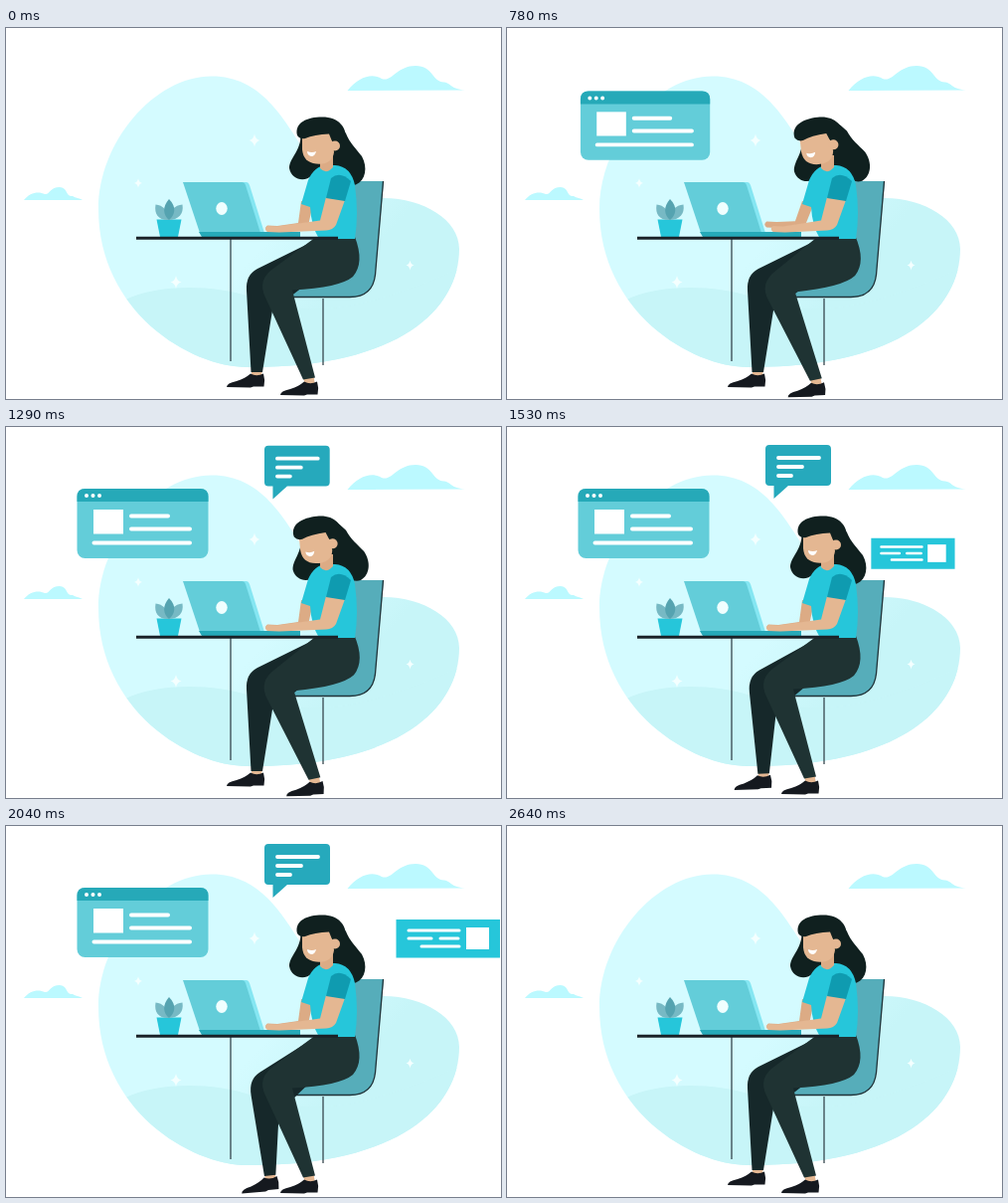
Animation of 498 by 373 pixels, one loop 2700 ms. Source, as an HTML page:

```html
<!DOCTYPE html>
<html lang="en">
<head>
<meta charset="utf-8">
<title>Working at a desk</title>
<style>
  html, body { margin: 0; width: 100%; height: 100%; overflow: hidden; background: #fff; }
  svg { display: block; width: 100vw; height: 100vh; }
  .line { fill: none; stroke: #fff; stroke-linecap: round; }
  .skin { fill: #e4b792; }
  .shade { fill: #dcab85; }
</style>
</head>
<body>
<svg viewBox="0 0 498 373">
  <defs>
    <linearGradient id="sky" x1="0.2" y1="0.2" x2="0.9" y2="0.7">
      <stop offset="0.5" stop-color="#d4fbff"/>
      <stop offset="0.8" stop-color="#c7f5f8"/>
    </linearGradient>
    <path id="blobShape" d="M93 182C93 115 149 48.500 207 48.500C257 48.500 279 91 302 126C325 160 352 171 380 171C420 171 456 193 456 222C456 283 395 342 243 341C185 341 93 285 93 182Z"/>
    <clipPath id="blobClip"><use href="#blobShape"/></clipPath>
    <path id="star" d="M0-6.5Q1-1 5.5 0Q1 1 0 6.5Q-1 1-5.5 0Q-1-1 0-6.5Z" fill="#f4ffff"/>
    <path id="shoe" d="M222 361Q222 357 232 355Q241 352 246 347.500Q252 351 259 347.500Q261 354 259.500 360.500H249L246 361.500Z" fill="#15191f"/>
  </defs>

  <use href="#blobShape" fill="url(#sky)"/>
  <path clip-path="url(#blobClip)" d="M118 274C150 258 205 257 245 270S330 300 460 240V345H118Z" fill="#c7f5f8"/>
  <use href="#star" x="250" y="113"/>
  <use href="#star" x="171" y="255.500"/>
  <use href="#star" transform="translate(133 156) scale(.72)"/>
  <use href="#star" transform="translate(406.500 238.500) scale(.75)"/>
  <g fill="#bbf9ff">
    <path d="M343.500 63C355 49 368 45 378 51C388 55 393 38 412 38C430 38 428 54 441 54.500C449 56 446 61 462 62.500Z"/>
    <path d="M18 173C24 165 33 164 39 167C44 168 44 160 54 160C62 160 60 170 67 169C70 171 74 171 77 173Z"/>
  </g>

  <g id="page">
    <rect x="71.500" y="62" width="132" height="70" rx="8" fill="#63cdd9"/>
    <path d="M71.500 75V70Q71.500 62 79.500 62H195.500Q203.500 62 203.500 70V75Z" fill="#26a9b8"/>
    <path class="line" stroke-width="4" d="M81 69h.01M87.500 69h.01M94 69h.01M126 89.500H163M126 102.500H185M88.500 116.500H185"/>
    <path d="M88 83h30v24.500h-30z" fill="#fff"/>
  </g>
  <g id="bubble">
    <path d="M264 18H322Q326 18 326 22V55Q326 59 322 59H283L268.500 72V59H264Q260 59 260 55V22Q260 18 264 18Z" fill="#26a9bc"/>
    <path class="line" stroke-width="3.800" d="M273 31H314M273 40H297M273 49H286"/>
  </g>
  <g id="card">
    <path d="M392.500 94h104.500v38.500h-104.500z" fill="#26c6da"/>
    <path class="line" stroke-width="3" d="M405 105H456M405 113H428M437 113H455M418 121H456"/>
    <path d="M463 102h23v22h-23z" fill="#fff"/>
  </g>

  <path d="M346 154H380L371.500 248Q369 270.500 346 270.500H289V245L340 230Z" fill="#56adba"/>
  <path d="M379.500 154L371.500 248Q369 270.500 346 270.500H289" fill="none" stroke="#203238" stroke-width="1.300"/>
  <path d="M226 212V335M319 272V339" stroke="#37474f" stroke-width="1.300"/>

  <g id="backLeg">
    <path class="skin" d="M247 342H258L257 351H247Z"/>
    <use href="#shoe"/>
    <path d="M316 211L253 242Q241 248 242 264L246.500 346H258L268 284L325 240Z" fill="#16282a"/>
  </g>
  <g id="frontLeg">
    <path class="skin" d="M298 347H309L311 359H301Z"/>
    <use href="#shoe" x="54" y="8"/>
    <path d="M312 210H351Q361 236 349 250Q336 261 288 263.500L311 351.500L299 353.500L261 271Q252 253 270 241Z" fill="#1f3333"/>
  </g>

  <path d="M151.500 192.500H176.500L173 210H155Z" fill="#26c6da"/>
  <path d="M163 193C153 193 149 187 150.500 177.500C158 178 163 184 163.500 191C164 184 170 178 177.500 177.500C179 187 174 193 163 193Z" fill="#77b9c4"/>
  <path d="M164 172C157 180 158 188 164 193C170 188 172 180 164 172Z" fill="#55a3b0"/>

  <path d="M234 155H242Q244 155 245 158L260 206H240Z" fill="#85e6f2"/>
  <path d="M178 155H237Q240 155 241 158L256 206H195Z" fill="#63cdd9"/>
  <path d="M194 205H296V210H197Z" fill="#26a9b8"/>
  <ellipse cx="217" cy="181.500" rx="5.700" ry="6.500" fill="#f0ffff"/>

  <path id="hair" d="M296 104C299 122 285 130 285 141C287 152 300 156 308 148L330 145C338 150 342 160 352 157.500C362 153 364 140 358 129C352 121 346 116 342 106Q330 91 318 92Q300 92 296 104Z" fill="#10201f"/>
  <path id="farArm" class="shade"/>
  <path d="M304 153Q310 139 322 138H331Q347 139 351 158Q355 187 351 212H315Q307 199 306 180L297 177Z" fill="#26c6da"/>
  <path class="shade" d="M316 128H329V140Q322 148 316 141Z"/>
  <path id="nearArm" class="skin"/>
  <path d="M327 151Q336 143 347 154L341 174L322 171Z" fill="#0f9bb0"/>
  <path d="M131 211.300H334" stroke="#1a2228" stroke-width="3"/>

  <g id="head">
    <path class="skin" d="M298 106L328 104L330 125Q328 138 312 136.500Q299 135 298 122Z"/>
    <path d="M293 108C290 95 303 89.500 318 89.500C335 89.500 343 100 342 113L331 118Q327 113 325 106.500Q310 107 301 111Q296 112 293 108Z" fill="#10201f"/>
    <circle class="skin" cx="331" cy="118.500" r="5"/>
    <path d="M303 124Q308 126 312 124Q311 129 307 129Q303 128 303 124Z" fill="#fff"/>
  </g>
</svg>
<script>
  const LOOP = 2700, EXIT_END = 2640, RATE = 0.018;
  const $ = id => document.getElementById(id);

  // Smooth out-and-back movement between two times, 0 to 1 to 0.
  const swing = (t, from, to) => t > from && t < to ? Math.sin(Math.PI * (t - from) / (to - from)) ** 2 : 0;
  const approach = ms => ms > 0 ? 1 - Math.exp(-RATE * ms) : 0;

  const rotate = (id, deg, x, y) => $(id).setAttribute('transform', `rotate(${deg} ${x} ${y})`);

  // Panels grow out of the laptop and shrink back into it.
  function pop(id, t, start) {
    const s = approach(t - start) * approach(EXIT_END - t);
    $(id).setAttribute('transform', `translate(258 185) scale(${s}) translate(-258 -185)`);
  }

  // Hand outline from the underside of the wrist round to its top.
  const hand = (x, y) => `L${x + 14} ${y + 3.5}L${x + 2} ${y + 3}Q${x - 2} ${y} ${x + 2} ${y - 3}L${x + 12} ${y - 2.5}`;

  function drawArms(reach) {
    const elbow = 294 - 7 * reach;
    $('farArm').setAttribute('d', `M297 174L309 176L${elbow + 10} ${199 - reach}${hand(261 - 3 * reach, 201.5 - 7 * reach)}L${elbow} ${196 - 3 * reach}Z`);
    $('nearArm').setAttribute('d', `M322 170L341 173L332 198Q329 203 322 203.5${hand(261 + 8 * reach, 202)}L316 193.5Z`);
  }

  function draw(t) {
    pop('page', t, 540);
    pop('bubble', t, 990);
    pop('card', t, 1440);
    drawArms(swing(t, 0, 1080));

    const lean = swing(t, 530, 1530);
    rotate('head', -12 * lean, 318, 142);
    rotate('hair', -12 * lean, 318, 105);
    rotate('frontLeg', -5.2 * lean, 330, 225);
    rotate('backLeg', -8.3 * swing(t, 1320, 2400), 308, 225);
  }

  function tick() {
    draw(performance.now() % LOOP);
    requestAnimationFrame(tick);
  }
  tick();
</script>
</body>
</html>
```
